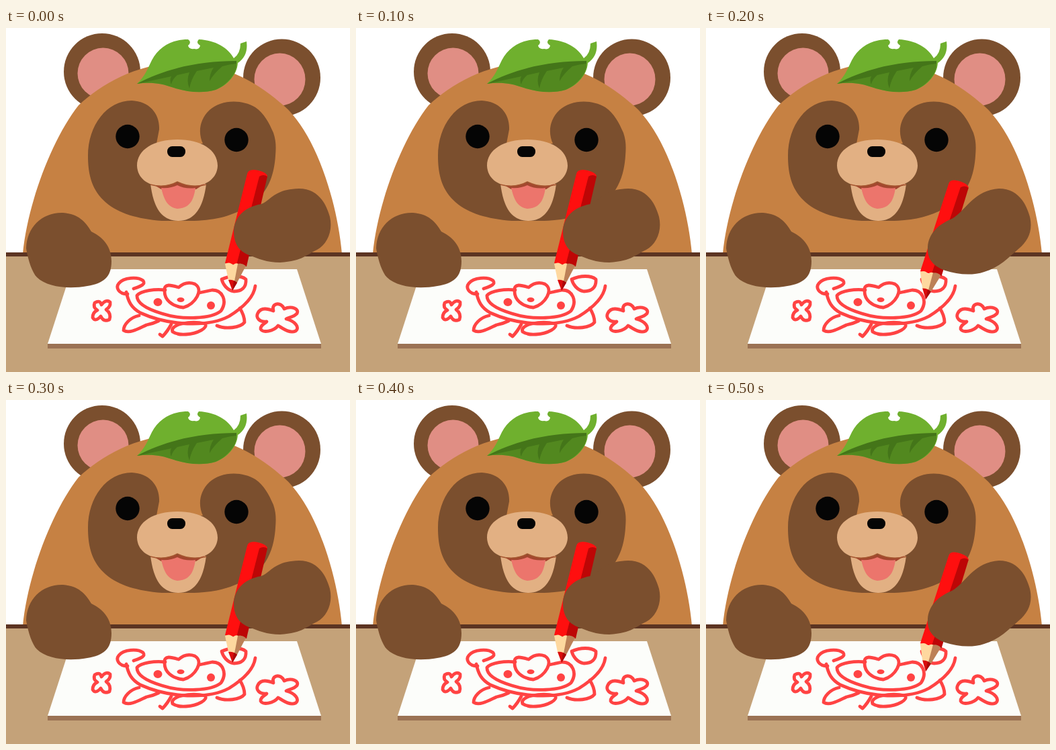
Write an HTML page that moves like this. It is 512 by 512 pixels and loops after 600 ms.

```html
<!DOCTYPE html>
<html>
<head>
<meta charset="utf-8">
<style>
html, body { margin: 0; width: 100%; height: 100%; overflow: hidden; background: #fff; }
svg { display: block; width: 100vw; height: 100vh; }
.fur { fill: #7b4f2e; }
.pink { fill: #e08e84; }
.cream { fill: #e2b083; }
.ink { fill: none; stroke: #ff4343; stroke-width: 4.8; stroke-linecap: round; stroke-linejoin: round; }
</style>
</head>
<body>
<svg viewBox="0 0 512 512">
  <!-- ears and body -->
  <circle class="fur" cx="143" cy="65" r="57"/>
  <circle class="pink" cx="144.500" cy="67.500" r="38"/>
  <circle class="fur" cx="410.500" cy="74" r="57.500"/>
  <ellipse class="pink" cx="407.500" cy="76.500" rx="38" ry="39"/>
  <path fill="#c68143" d="M25 336C32 262 68 166 108 115C144 82 194 53 262 51C320 53 368 76 408 111C457 148 492 250 500 336Z"/>

  <!-- leaf -->
  <path fill="#6fb02e" d="M195 83C207 72 211 60 217 48C228 27 248 17 271 17Q277 21 271 26Q272 32 280 31Q288 33 289 26Q282 22 287 17C312 18 331 30 339 45Q349 38 349 23L358 20Q361 41 345 52C344 70 329 86 312 92C292 98 268 95 250 89C231 82 214 80 195 83Z"/>
  <path fill="#52881f" d="M195 83C240 66 290 53 343 52C345 66 331 84 312 92C292 98 268 95 250 89C231 82 214 80 195 83Z"/>
  <path fill="#447519" d="M195 83C238 60 288 49 343 49V53Q332 54 322 57Q309 68 303 79Q303 68 309 59L284 64Q275 77 273 90Q268 78 273 66L255 70Q247 77 246 84Q243 78 246 72Z"/>

  <!-- face -->
  <path class="fur" d="M122 190C122 145 150 108 187 108C214 109 229 128 228 151L224 172H293C286 157 287 137 303 122C319 107 350 105 371 118C384 127 391 140 398 156C402 168 402 177 401 190C399 222 388 249 361 265C338 279 314 286 280 287H232C195 284 168 276 149 260C127 241 122 217 122 190Z"/>
  <path class="cream" d="M215 232C219 262 228 287 257 287C286 287 295 257 298 232Z"/>
  <path fill="#a4472f" d="M216 231H297L283 240H231Z"/>
  <path fill="#ec756c" d="M231 238Q245 239 255 234Q267 240 282 238C279 259 272 268 255 269C240 267 235 255 231 238Z"/>
  <path class="cream" d="M195 205C195 181 220 166 255 166C290 166 315 181 315 205C314 231 283 243 255 229C226 243 196 231 195 205Z"/>
  <path fill="none" stroke="#a4552f" stroke-width="1.500" d="M215 233Q237 239 255 229Q276 239 298 233"/>
  <circle cx="181" cy="161.500" r="17.700" fill="#050505"/>
  <circle cx="343" cy="166.500" r="17.700" fill="#050505"/>
  <rect x="240" y="176" width="27" height="16" rx="7.500" fill="#050505"/>

  <!-- table and paper -->
  <path fill="#c4a279" d="M0 337H512V512H0Z"/>
  <path fill="#5c3422" d="M0 334H512V340H0Z"/>
  <path fill="#9b7254" d="M62 470H469V477H62Z"/>
  <path fill="#fcfdfa" d="M98 359H433L469 470H62Z"/>
  <path class="fur" d="M30 328C31 296 54 274 85 275C108 277 118 288 127 303C148 313 157 329 157 347C157 371 145 380 121 384C94 389 61 386 46 371C39 364 33 346 30 328Z"/>

  <!-- doodle -->
  <g class="ink">
    <path d="M181 396C167 396 163 386 168 380C175 371 196 370 204 376C209 382 198 385 190 388"/>
    <path d="M179 393C182 407 186 416 200 424C242 443 300 446 332 429C353 416 369 400 371 384"/>
    <path d="M237 390C222 388 201 391 195 398C194 410 212 419 232 425C262 435 306 433 320 421C330 406 322 390 307 390L288 394"/>
    <path d="M236 392C234 379 247 383 257 386Q268 376 281 381C295 389 282 411 264 416C246 414 236 404 236 392Z"/>
    <path d="M198 428C184 431 175 442 175 450C184 456 200 446 209 442Q219 440 227 436"/>
    <path d="M246 441Q240 452 233 459L229 456"/>
    <path d="M248 452C243 441 275 435 296 440C302 446 285 455 268 456Q255 457 248 452"/>
    <path d="M314 443C327 449 349 446 355 438Q355 428 348 417"/>
    <path d="M321 374C334 368 350 368 357 374C358 386 351 392 339 392C329 390 323 382 321 374Z"/>
    <path d="M132 409Q140 404 142 412Q149 403 155 408Q156 415 149 419Q157 425 154 434Q145 438 141 429Q133 438 129 431Q129 423 136 420Q129 416 132 409Z"/>
    <path d="M398 421C394 409 410 407 414 418C425 413 437 418 433 425C429 430 420 431 417 433C430 436 438 446 431 451C422 455 412 447 405 443C398 452 382 454 379 448C378 443 385 440 388 437C377 438 371 431 375 424C380 415 390 418 398 421Z"/>
  </g>
  <g fill="#ff4343">
    <ellipse cx="226" cy="408" rx="6.500" ry="6"/>
    <ellipse cx="305" cy="413" rx="6" ry="6"/>
    <ellipse cx="260" cy="404.500" rx="5.500" ry="3.500"/>
  </g>

  <!-- pencil and drawing paw -->
  <g id="pencil">
    <path fill="#ff0f0f" d="M359 217Q360 211 369 211Q386 213 389 220L346 353L326 350Z"/>
    <path fill="#bd0606" d="M377 221Q383 217 389 221L358 355L343 353Z"/>
    <path fill="#fed89f" d="M326 351Q333 347 338 353Q341 349 346 351L343 379L331 375Z"/>
    <path fill="#bc8057" d="M345 351Q351 349 357 354L344 379L340 377Z"/>
    <path fill="#d90c0c" d="M331 375Q338 374 344 379L337 391Z"/>
    <path fill="#a80808" d="M339 376L344 379L337 391Z"/>
  </g>
  <path id="paw" class="fur"/>
</svg>
<script>
const pencil = document.getElementById('pencil');
const paw = document.getElementById('paw');

const raised = 'M339 301C340 284 352 267 380 262C395 256 399 240 436 239C464 239 476 260 482 281C487 302 478 322 463 330C449 336 442 347 408 349C388 349 375 343 364 339C344 332 339 318 339 301Z';
const lowered = 'M330 326C331 306 346 292 366 284C386 273 397 242 436 239C464 239 476 260 482 281C487 302 479 317 466 328C451 341 436 357 414 363C396 369 374 367 356 361C338 354 329 344 330 326Z';

// Each pose: paw shape and shift, pencil shift and tilt about its tip
const poses = [
  { shape: raised, slide: 0, x: 0, y: 0, tilt: 0 },
  { shape: raised, slide: -31, x: -31, y: 0, tilt: 0 },
  { shape: lowered, slide: 0, x: -10, y: 13, tilt: 4 }
];

function draw(time) {
  const { shape, slide, x, y, tilt } = poses[Math.floor(time / 100) % poses.length];
  pencil.setAttribute('transform', `translate(${x} ${y}) rotate(${tilt} 337 391)`);
  paw.setAttribute('d', shape);
  paw.setAttribute('transform', `translate(${slide} 0)`);
}

const start = performance.now();
function tick() {
  draw(performance.now() - start);
  requestAnimationFrame(tick);
}
tick();
</script>
</body>
</html>
```
